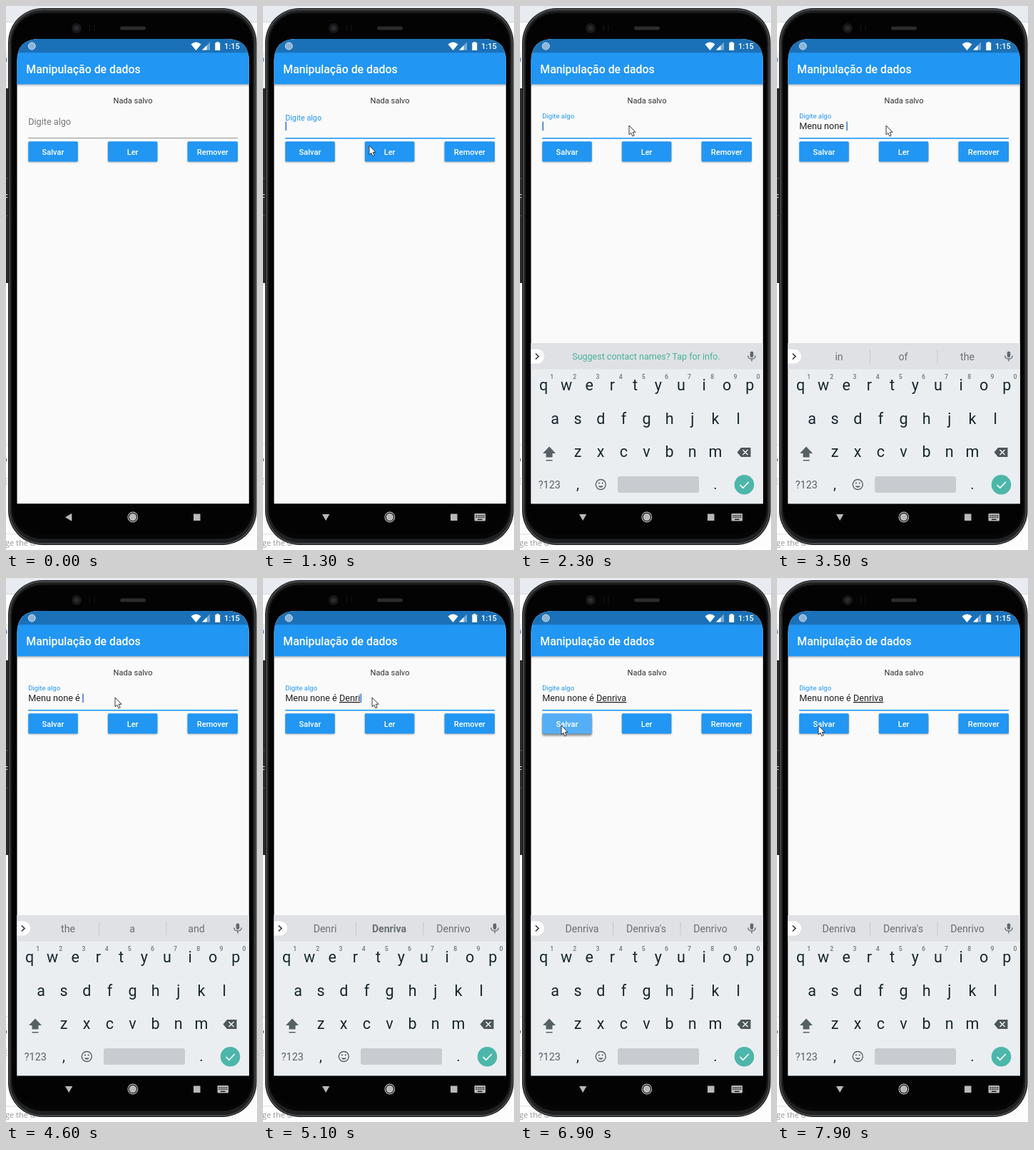
These frames come from a looping animation (352x760 px, 8 s). An HTML page:

```html
<!DOCTYPE html>
<html lang="pt">
<head>
<meta charset="utf-8">
<title>Manipulação de dados</title>
<style>
html, body { margin: 0; width: 100%; height: 100%; overflow: hidden; background: #fff; }
svg { display: block; width: 352px; height: 760px; }
text { font-family: Roboto, "Noto Sans", sans-serif; white-space: pre; }
.mid { text-anchor: middle; }
.med { font-weight: 500; }
.side { font-family: "Open Sans", sans-serif; }
</style>
</head>
<body>
<svg viewBox="0 0 352 760" xmlns="http://www.w3.org/2000/svg">
  <defs>
    <clipPath id="screen"><path d="M15.500 695.300V77Q15.500 46 46.500 46H310Q340.800 46 340.800 77V695.300Z"/></clipPath>
    <clipPath id="saveClip"><rect x="31.2" y="189.3" width="69.6" height="28.2" rx="1.6"/></clipPath>
    <linearGradient id="drop" x1="0" x2="0" y1="0" y2="1">
      <stop offset="0" stop-color="#000" stop-opacity=".26"/><stop offset="1" stop-color="#000" stop-opacity="0"/>
    </linearGradient>
    <filter id="soft" x="-20%" y="-50%" width="140%" height="220%"><feGaussianBlur stdDeviation="1"/></filter>
  </defs>

  <!-- desktop behind the phone -->
  <rect width="352" height="760" fill="#fdfdfd"/>
  <rect width="352" height="22" fill="#e8ecf0"/>
  <rect y="22" width="352" height="1" fill="#d4d8dc"/>
  <rect y="64" width="5" height="51" fill="#eef1f4"/>
  <rect y="115" width="5" height="272" fill="#2a2a2b"/>
  <path d="M0 241H5M0 293H5" stroke="#555"/>
  <path d="M0 613H5M0 738H30" stroke="#dcdcdc"/>
  <text class="side" x="-4" y="78" font-size="11" fill="#3872b8">a</text>
  <text class="side" x="-4" y="272" font-size="13" fill="#eee">F</text>
  <text class="side" x="-5" y="637" font-size="11" fill="#444">o</text>
  <text class="side" x="-4" y="668" font-size="11" fill="#999">E</text>
  <text class="side" x="-1" y="754" font-size="11" fill="#999">ge the d</text>

  <!-- phone body -->
  <rect x="3" y="3" width="348.500" height="750" rx="48" fill="#161718"/>
  <rect x="5" y="5" width="344.500" height="746" rx="46" fill="#1f2021" stroke="#47494b" stroke-width="1.800"/>
  <rect x="8" y="9.500" width="338.500" height="735" rx="42" fill="#060606"/>
  <rect x="10" y="12" width="334.500" height="727" rx="40" fill="#030303"/>
  <circle cx="99" cy="31" r="7" fill="#161719"/>
  <circle cx="99" cy="31" r="3.500" fill="#292b2e"/>
  <path d="M117.500 26V35M124 26V35" stroke="#101112" stroke-width="1.500"/>
  <rect x="160" y="28.500" width="36" height="5" rx="2.500" fill="#2a2b2c"/>

  <g clip-path="url(#screen)">
    <rect x="15" y="46" width="326" height="650" fill="#fafafa"/>
    <rect x="15" y="109" width="326" height="4" fill="url(#drop)"/>
    <rect x="15" y="46" width="326" height="20" fill="#1b71b8"/>
    <rect x="15" y="65.200" width="326" height="44.200" fill="#2196f3"/>
    <circle cx="36.300" cy="56" r="5" fill="#8db5d8" stroke="#c5d9ea"/>
    <path d="M259.500 53.500Q266.500 47.500 273.500 53.500L266.500 62Z" fill="#fff"/>
    <path d="M275 61.500L286 50.500V61.500Z" fill="#fff" opacity=".4"/>
    <path d="M275 61.500L281.500 55V61.500Z" fill="#fff"/>
    <path d="M293.300 51.300H295.200V50H298.200V51.300H300.200V62H293.300Z" fill="#fff"/>
    <text class="med" x="306" y="60" font-size="11.07" fill="#fff">1:15</text>
    <text class="med" x="28.300" y="93.500" font-size="15.82" fill="#fff">Manipulação de dados</text>
    <text class="mid" x="178" y="135.700" font-size="11.07" fill="#303030">Nada salvo</text>
    <text id="label" x="31.200">Digite algo</text>
    <text x="31.200" y="172" font-size="12.66" fill="#212121"><tspan id="done"></tspan><tspan id="word" text-decoration="underline"></tspan></text>
    <rect id="caret" y="161.500" width="1.6" height="12.500" fill="#4279d8"/>
    <rect id="line" x="31.200" y="184" width="293.900"/>
    <rect id="lift" x="31.200" y="194" width="69.600" height="27" rx="2" fill="#000" filter="url(#soft)"/>
    <g id="buttons"></g>
    <circle id="ripple" cx="58" cy="207" fill="#fff" clip-path="url(#saveClip)"/>

    <g id="keyboard">
      <rect x="15" y="471" width="326" height="225" fill="#ebeef1"/>
      <rect x="15" y="471" width="326" height="36.500" fill="#dfe1e5"/>
      <path d="M15 479.500H24A10 10 0 0 1 24 499.500H15Z" fill="#fff"/>
      <path d="M21.800 485.500L26 489.500L21.800 493.500" fill="none" stroke="#30383c" stroke-width="1.6"/>
      <rect x="322.700" y="482.500" width="4.600" height="8.600" rx="2.300" fill="#60676b"/>
      <path d="M319.800 488.500Q320 493 325 493Q330 493 330.200 488.500M325 493V496.500" fill="none" stroke="#60676b" stroke-width="1.3"/>
      <path id="dividers" d="M130.500 480V499M225 480V499" stroke="#c3c6ca"/>
      <g id="hints"></g>
      <g id="keys"></g>
      <path d="M41 615.500L50 625H45.500V630.500H36.500V625H32Z" fill="#566065"/>
      <rect x="36.500" y="634" width="9" height="1.500" fill="#566065"/>
      <path d="M304.500 623.500L310 617H323.500V630H310Z" fill="#4d565b"/>
      <path d="M312.500 620L319.500 627M319.500 620L312.500 627" stroke="#fff" stroke-width="1.3"/>
      <circle cx="113.300" cy="668.500" r="7" fill="none" stroke="#566065" stroke-width="1.4"/>
      <path d="M109.500 670.500Q113.300 675 117.100 670.500Z" fill="#566065"/>
      <circle cx="110.900" cy="666.500" r="1.100" fill="#566065"/>
      <circle cx="115.700" cy="666.500" r="1.100" fill="#566065"/>
      <rect x="137" y="657" width="114" height="23" rx="3" fill="#c8cbcf"/>
      <circle cx="314.500" cy="668.800" r="13.800" fill="#4db6aa"/>
      <path d="M308.500 669L312.800 673.300L320.800 665" fill="none" stroke="#fff" stroke-width="1.600"/>
    </g>
  </g>

  <!-- navigation bar -->
  <path id="back" fill="#b9b9b9"/>
  <circle cx="177.800" cy="714" r="6.800" fill="none" stroke="#b9b9b9" stroke-width="1.200"/>
  <circle cx="177.800" cy="714" r="5.200" fill="#b9b9b9"/>
  <rect x="263" y="709.500" width="9.500" height="9.500" fill="#b9b9b9"/>
  <g id="imeIcon">
    <rect x="296.500" y="709" width="15.500" height="10.500" rx="1.200" fill="#b9b9b9"/>
    <path d="M298.500 711.700H310.500M298.500 714.300H310.500" stroke="#111" stroke-width="1.400" stroke-dasharray="1.4 1.2"/>
    <path d="M301 717.300H307.500" stroke="#111" stroke-width="1.300"/>
  </g>

  <path id="mouse" d="M0 0V12.800L2.900 10.200L4.900 14.900L7.100 13.900L5.200 9.300H9Z" fill="#fff" stroke="#222" stroke-width=".9"/>
</svg>

<script>
const LOOP = 8000, STEP = 100;
const $ = id => document.getElementById(id);
const set = (el, attrs) => { for (const k in attrs) el.setAttribute(k, attrs[k]); };

function add(parent, tag, attrs, content = "") {
  const el = document.createElementNS("http://www.w3.org/2000/svg", tag);
  set(el, attrs);
  el.textContent = content;
  return parent.appendChild(el);
}

const label = (parent, x, y, size, fill, content, cls = "mid") =>
  add(parent, "text", { x, y, "font-size": size, fill, class: cls }, content);

// Buttons: name, left, width
for (const [name, x, width] of [["Salvar", 31.2, 69.6], ["Ler", 142.8, 69.6], ["Remover", 254.5, 70.5]]) {
  const box = { x, width, height: 28.2, rx: 1.6 };
  add($("buttons"), "rect", { ...box, y: 190.3, fill: "#000", opacity: .28, filter: "url(#soft)" });
  add($("buttons"), "rect", { ...box, y: 189.3, fill: "#2196f3" });
  label($("buttons"), x + width / 2, 207.6, 11.07, "#fff", name, "mid med");
}

// Letter rows: letters, first centre, baseline
const letters = [];
for (const [row, left, y] of [["qwertyuiop", 33, 537], ["asdfghjkl", 49, 583.5], ["zxcvbnm", 81, 630]]) {
  [...row].forEach((c, i) => {
    const x = left + i * 32.15;
    letters.push(label($("keys"), x, y, 21.5, "#17272d", c));
    if (y === 537) label($("keys"), x + 11.7, 520.7, 8.7, "#6d757a", (i + 1) % 10, "mid med");
  });
}
label($("keys"), 41.3, 674, 14.3, "#566065", "?123");
label($("keys"), 81, 675, 20, "#17272d", ",");
label($("keys"), 274, 675, 20, "#17272d", ".");

const hints = [87, 177, 267].map(x => label($("hints"), x, 495, 14.1, "#6a7074", ""));
const offer = label($("hints"), 177, 494, 12.5, "#45b29d", "Suggest contact names? Tap for info.");

// Typing: time, finished text, word in progress, three hints, bold middle hint
const typing = [
  [0, "", "", ""],
  [2500, "", "M", "M,My,Me", 1],
  [2600, "", "Me", "Me,Men,Met", 0],
  [2700, "", "Men", "Men,Mention,Menu", 0],
  [2800, "", "Menu", "Menu,Menus,Mind", 0],
  [3000, "Menu ", "", "is,and,for"],
  [3100, "Menu ", "n", "n,not,no", 1],
  [3200, "Menu ", "no", "no,not,now", 0],
  [3300, "Menu ", "non", "non,none,not", 1],
  [3400, "Menu ", "none", "none,nine,nones", 0],
  [3500, "Menu none ", "", "in,of,the"],
  [4000, "Menu none ", "´", "in,of,the"],
  [4100, "Menu none ", "é", "in,of,the"],
  [4200, "Menu none ", "é", "é,e,etc", 0],
  [4600, "Menu none é ", "", "the,a,and"],
  [4900, "Menu none é ", "D", "D,Do,Did", 1],
  [5000, "Menu none é ", "Den", "Den,Dense,Dent", 0],
  [5100, "Menu none é ", "Denri", "Denri,Denriva,Denrivo", 1],
  [5200, "Menu none é ", "Denriv", "Denriv,Denriva,Denrivo", 1],
  [5300, "Menu none é ", "Denriva", "Denriv,Denriva,Denrivo", 1],
  [5400, "Menu none é ", "Denriva", "Denriva,Denriva's,Denrivo", 0]
];

// Pointer: time, x, y; null hides it
const pointer = [
  [0, null], [100, 322, 76], [400, 250, 140], [700, 160, 214], [900, 152, 176],
  [1100, 152, 170], [1300, 149, 195], [1400, 150, 188], [1600, 153, 167],
  [6000, null], [6200, 89, 228], [6800, 58, 206], [8000, 58, 206]
];

const ramp = (t, a, b) => Math.min(1, Math.max(0, (t - a) / (b - a)));
const within = (t, a, b) => t >= a && t < b;
const current = (table, t) => table.findLastIndex(row => row[0] <= t);

function pointerAt(t) {
  const i = current(pointer, t), a = pointer[i], b = pointer[i + 1];
  if (a[1] === null) return null;
  if (!b || b[1] === null) return [a[1], a[2]];
  const k = ramp(t, a[0], b[0]);
  return [a[1] + (b[1] - a[1]) * k, a[2] + (b[2] - a[2]) * k];
}

// The caret blinks 500 ms on, 500 ms off after focus or the last key
function caretOn(t) {
  if (t < 1100) return false;
  if (t < 2100) return t < 1600;
  if (t < 5400) return true;
  return Math.floor((t - 5400) / 500) % 2 === 0;
}

function draw(t) {
  const focus = t >= 1100;
  const float = ramp(t, 1150, 1400);
  set($("label"), {
    y: 165.5 - 9 * float, "font-size": 12.66 * (1 - float / 4), fill: focus ? "#2196f3" : "#757575"
  });
  set($("line"), { height: focus ? 1.6 : .9, fill: focus ? "#2196f3" : "#888" });

  const [, done, word, list, bold] = typing[current(typing, t)];
  $("done").textContent = done;
  $("word").textContent = word;
  const width = done || word ? $("done").parentNode.getComputedTextLength() : 0;
  set($("caret"), { x: 31.4 + width, opacity: +caretOn(t) });

  const names = list.split(",");
  hints.forEach((el, i) => {
    el.textContent = names[i] || "";
    el.style.fontWeight = bold && i === 1 ? 700 : 400;
  });
  set(offer, { opacity: list ? 0 : 1 });
  set($("dividers"), { opacity: list ? 1 : 0 });

  const caps = within(t, 2400, 2600) || within(t, 4800, 5000);
  letters.forEach(el => {
    el.textContent = caps ? el.textContent.toUpperCase() : el.textContent.toLowerCase();
  });

  const shown = 1 - (1 - ramp(t, 1300, 1600)) ** 2;
  set($("keyboard"), { transform: `translate(0 ${224 * (1 - shown)})`, opacity: t > 1300 ? 1 : 0 });
  set($("back"), { d: t >= 1200 ? "M83 710H93.300L88.150 719Z" : "M83 714.200L92.300 708.700V719.700Z" });
  set($("imeIcon"), { opacity: t >= 1200 ? 1 : 0 });

  const press = ramp(t, 6700, 6900) * (1 - ramp(t, 6900, 7200));
  set($("ripple"), { r: 60 * ramp(t, 6700, 6900), opacity: .24 * press });
  set($("lift"), { opacity: .3 * press });

  const p = pointerAt(t);
  set($("mouse"), { opacity: p ? 1 : 0, transform: p ? `translate(${p[0]} ${p[1]})` : "" });
}

let last = -1;
const start = performance.now();
function tick() {
  const t = Math.floor(((performance.now() - start) % LOOP) / STEP) * STEP;
  if (t !== last) draw(last = t);
  requestAnimationFrame(tick);
}
tick();
</script>
</body>
</html>
```
